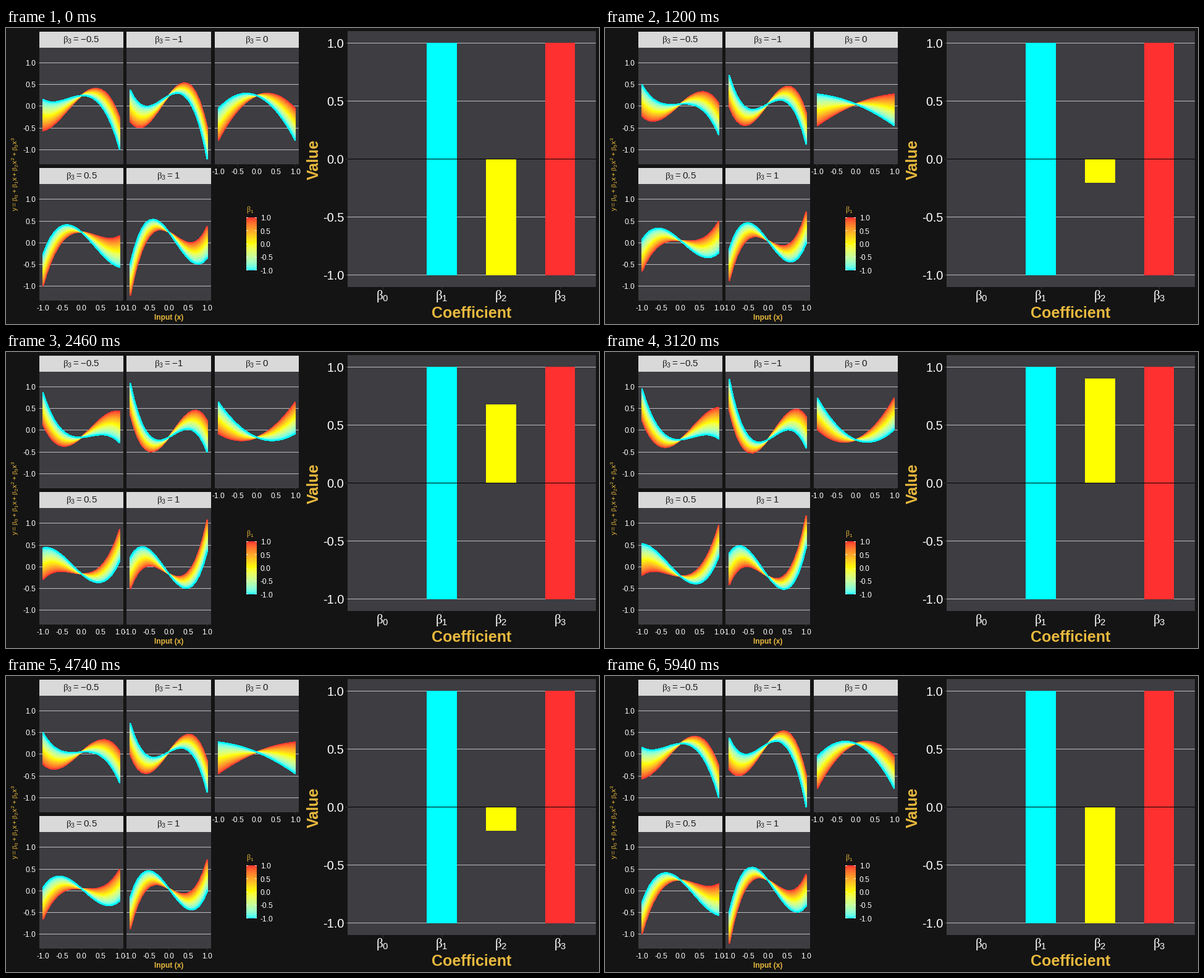
These frames come from a looping animation (960x480 px, 6000 ms). A matplotlib script:

```python
import numpy as np
import matplotlib.pyplot as plt
from matplotlib.animation import FuncAnimation
from matplotlib.collections import LineCollection
from matplotlib.patches import Rectangle

W, H, DPI = 960, 480, 100
PT = 72 / DPI  # points per pixel
FRAMES, INTERVAL = 100, 60

BACK, PANEL, GRID, STRIP = "#141414", "#3d3d42", "#bebebe", "#d9d9d9"
TICK, GOLD = "#333333", "#e8b93e"
CYAN, YELLOW, RED = "#00ffff", "#ffff00", "#ff3030"

plt.rcParams.update({
    "font.family": "Liberation Sans",
    "mathtext.fontset": "custom",
    "mathtext.rm": "Liberation Sans",
    "mathtext.sf": "Liberation Serif",
    "mathtext.default": "rm",
})

fig = plt.figure(figsize=(W / DPI, H / DPI), dpi=DPI, facecolor=BACK)
ax = fig.add_axes([0, 0, 1, 1])
ax.axis("off")


def rect(x, y, w, h, color, z=1):
    return ax.add_patch(Rectangle((x, y), w, h, color=color, lw=0,
                                  antialiased=False, zorder=z))


def text(x, y, s, size, color="white", ha="center", va="baseline", **kw):
    ax.text(x, y, s, fontsize=size * PT, color=color, ha=ha, va=va,
            zorder=6, **kw)


def beta(i):
    return rf"\mathsf{{β}}_{{{i}}}"


# Colour scale, blended in a perceptual (cube root XYZ) space
RGB_XYZ = np.array([[0.4124, 0.3576, 0.1805],
                    [0.2126, 0.7152, 0.0722],
                    [0.0193, 0.1192, 0.9505]])


def to_cube(color):
    c = np.array(plt.matplotlib.colors.to_rgb(color))
    lin = np.where(c <= 0.04045, c / 12.92, ((c + 0.055) / 1.055) ** 2.4)
    return np.cbrt(RGB_XYZ @ lin)


def ramp(values):
    stops = np.array([to_cube(c) for c in (CYAN, YELLOW, RED)])
    mix = np.array([np.interp(values, [-1, 0, 1], s) for s in stops.T])
    lin = np.clip(np.linalg.inv(RGB_XYZ) @ mix ** 3, 0, 1)
    rgb = np.where(lin <= 0.0031308, lin * 12.92,
                   1.055 * lin ** (1 / 2.4) - 0.055)
    return np.clip(rgb.T, 0, 1)


# Orthonormal polynomials on the input grid
x = np.linspace(-1, 1, 21)
q, r = np.linalg.qr(np.vander(x, 4, increasing=True))
p1, p2, p3 = (q * np.sign(np.diag(r))).T[1:]

slopes = np.linspace(1, -1, 41)
slope_colors = ramp(slopes)
marks = [1, 0.5, 0, -0.5, -1]

# Small panels: beta3, left and right edge, strip top, y of zero
X_UNIT, Y_UNIT = 62.3, 70.4
panels = [
    (-0.5, 54, 190, 6, 126.5),
    (-1, 195, 332, 6, 126.5),
    (0, 338, 474, 6, 126.5),
    (0.5, 54, 190, 227, 347.75),
    (1, 195, 332, 227, 347.75),
]
curves = []

for b3, left, right, top, zero in panels:
    width, mid = right - left, (left + right) / 2
    rect(left, top, width, 26, STRIP)
    rect(left, top + 26, width, 189, PANEL)
    label = rf"${beta(3)}=\mathrm{{{b3:g}}}$"
    text(mid, top + 13.5, label, 15, "#1a1a1a", va="center")
    for m in marks:
        y = zero - m * Y_UNIT
        rect(left, round(y), width, 1, GRID, 2)
        if left == 54:
            rect(left - 3, round(y), 3, 1, TICK)
            text(48, round(y) + 5, f"{m:.1f}", 12, ha="right")
        if b3 >= 0:
            tx = mid + m * X_UNIT
            rect(round(tx - 0.5), top + 215, 1, 3, TICK)
            text(tx, top + 231, f"{m:.1f}", 12)
    lines = LineCollection([], colors=slope_colors, linewidths=1.4 * PT,
                           antialiaseds=False, capstyle="butt", zorder=3)
    ax.add_collection(lines)
    curves.append((lines, b3, mid, zero + 0.3))

text(264, 473, "Input (x)", 12, GOLD, weight="bold")
formula = (rf"$\mathrm{{y}}={beta(0)}+{beta(1)}\mathrm{{x}}"
           rf"+{beta(2)}\mathrm{{x}}^2+{beta(3)}\mathrm{{x}}^3$")
text(15, 237, formula, 11.4, GOLD, va="center", rotation=90)

# Colour legend
text(389, 295, f"${beta(1)}$", 12, GOLD, ha="left", va="center")
ax.imshow(ramp(np.linspace(1, -1, 300))[:, None, :], aspect="auto",
          extent=(389, 406, 393, 307), zorder=2)
for i, m in enumerate(marks):
    y = 307.5 + 21.3 * i
    for tx in (389, 403):
        rect(tx, round(y - 0.5), 3, 1, "white", 3)
    text(412, y + 5, f"{m:.1f}", 12, ha="left")

# Bar chart
LEFT, RIGHT, BAR_ZERO, BAR_UNIT, STEP = 553, 954, 212.2, 188, 95.8


def bar_span(v):
    """Top and height of a bar from zero to v, in whole pixels."""
    rows = sorted((round(BAR_ZERO), round(BAR_ZERO - v * BAR_UNIT)))
    return rows[0], rows[1] - rows[0] + 1


rect(LEFT - 0.5, 5, RIGHT - LEFT + 1, 415, PANEL)
for m in marks:
    y = round(BAR_ZERO - m * BAR_UNIT)
    rect(LEFT, y, RIGHT - LEFT + 1, 1, GRID, 2)
    rect(LEFT - 4, y, 4, 1, TICK)
    text(547, y + 8, f"{m:.1f}", 20, ha="right")
rect(LEFT, round(BAR_ZERO), RIGHT - LEFT + 1, 1, "black", 4)
for i in range(4):
    cx = 609.7 + STEP * i
    rect(round(cx), 420, 1, 4, TICK)
    text(cx, 435, f"${beta(i)}$", 21, va="center")
rect(681, 24, 49, 377, CYAN, 3)
rect(873, 24, 48, 377, RED, 3)
bar = rect(777, 212, 49, 0, YELLOW, 3)
text(753.5, 470, "Coefficient", 25, GOLD, weight="bold")
text(506, 213, "Value", 25, GOLD, weight="bold", rotation=90,
     rotation_mode="anchor")

ax.set_xlim(0, W)
ax.set_ylim(H, 0)

# Steps of 0.05 snapped to whole frames, then played backwards
HALF = FRAMES // 2
key_values = np.linspace(-1, 1, 41)
key_frames = np.round(np.arange(41) * (HALF - 1) / 40)


def update(frame):
    b2 = np.interp(min(frame, FRAMES - 1 - frame), key_frames, key_values)
    for lines, b3, mid, zero in curves:
        px = mid + x * X_UNIT
        base = b2 * p2 + b3 * p3
        lines.set_segments([
            np.column_stack([px, zero - Y_UNIT * (base + b1 * p1)])
            for b1 in slopes])
    top, height = bar_span(b2)
    bar.set_y(top)
    bar.set_height(height)
    return [bar] + [c[0] for c in curves]


anim = FuncAnimation(fig, update, frames=FRAMES, interval=INTERVAL,
                     repeat=True, repeat_delay=0)
plt.show()
```
